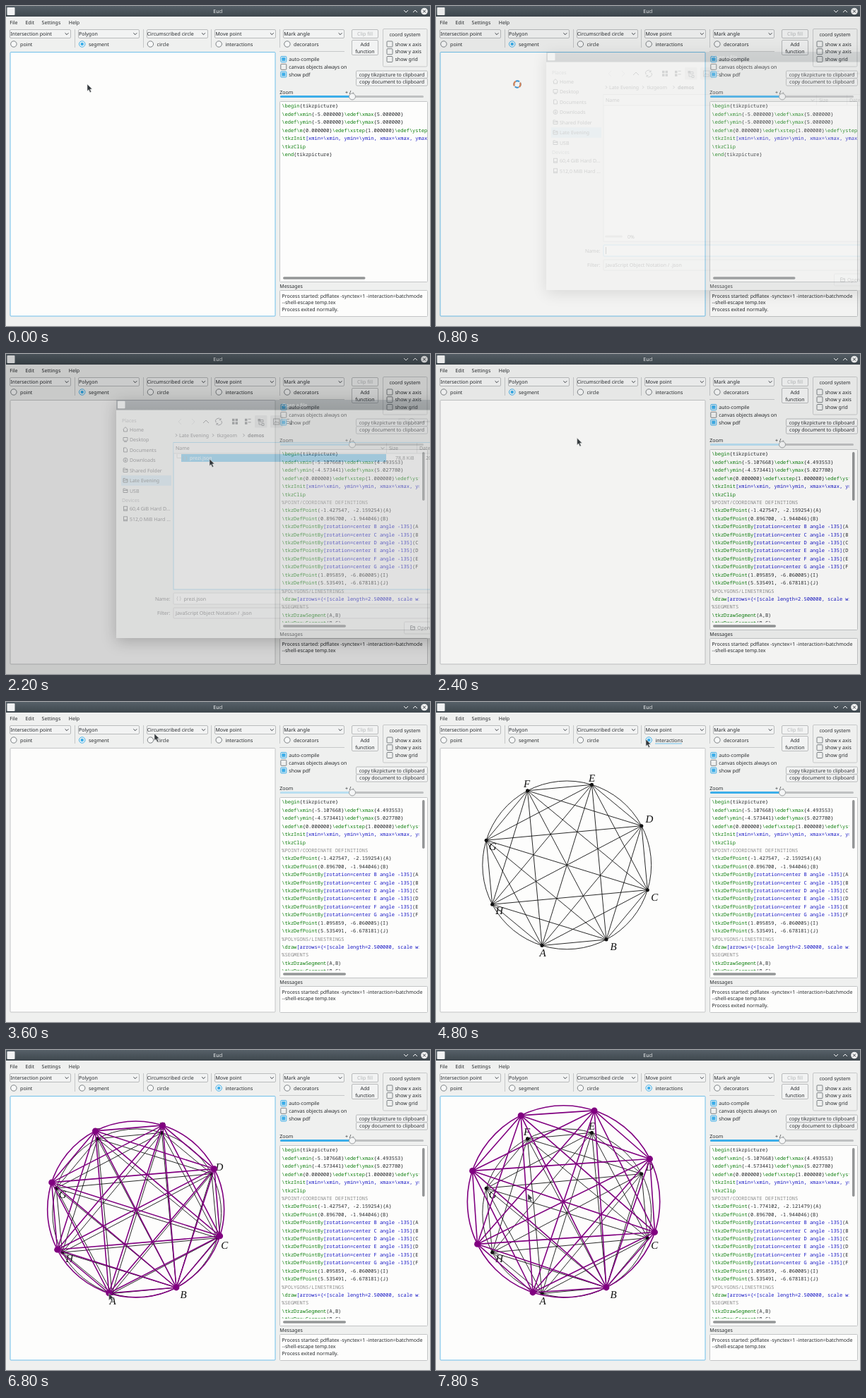
Animation of 600 by 454 pixels, one loop 8 s. Source, as an HTML page:

```html
<!DOCTYPE html>
<html lang="en">
<head>
<meta charset="utf-8">
<title>Eucl</title>
<style>
html, body { margin: 0; width: 100%; height: 100%; overflow: hidden; background: #eff0ef; }
svg { display: block; width: 600px; height: 454px; }
text { font: 7px "Noto Sans", sans-serif; fill: #26292c; white-space: pre; text-rendering: geometricPrecision; }
.mid { text-anchor: middle; }
.end { text-anchor: end; }
.bold { font-weight: bold; }
.grey { fill: #85898b; }
.pale { fill: #b4b6b7; }
.code text { font-family: "Noto Sans Mono", monospace; }
.cmd { fill: #0a7d0a; }
.opt { fill: #1414c4; }
.rem { fill: #8c8c8c; }
.label { font: italic 15px "Liberation Serif", serif; fill: #111; text-anchor: middle; }
.box { fill: #fdfdfc; stroke: #c3c5c6; }
.btn { fill: #f2f3f3; stroke: #b9bbbc; }
.line { fill: none; stroke: #3b4045; }
.soft { fill: none; stroke: #c6c8c9; }
.hot { stroke: #6fbfe9; }
.bar { fill: url(#bar); }
.ink { fill: #f2f3f4; }
.inkline { fill: none; stroke: #f2f3f4; }
.cross { fill: none; stroke: #3b4045; }
.off .bar { fill: #e4e6e6; }
.off .ink { fill: #b9bbbc; }
.off .inkline { stroke: #b9bbbc; }
.off .cross { stroke: #e4e6e6; }
.dot { fill: none; stroke: #7d8285; }
.on .dot { stroke: #3daee9; }
.pip { fill: #3daee9; visibility: hidden; }
.on .pip { visibility: inherit; }
#dialog { filter: drop-shadow(0 5px 11px rgba(0, 0, 0, .65)); }
#ghost { fill: none; stroke: #800080; stroke-width: 1.6; }
</style>
</head>
<body>
<svg id="stage" viewBox="0 0 600 454"></svg>
<script>
const STEP = 200, STEPS = 40;

const text = (x, y, s, cls = '') => `<text x="${x}" y="${y}" class="${cls}">${s}</text>`;
const rect = (x, y, w, h, cls, r = 0) =>
  `<rect x="${x}" y="${y}" width="${w}" height="${h}" rx="${r}" class="${cls}"/>`;
const fill = (x, y, w, h, color, r = 0) =>
  `<rect x="${x}" y="${y}" width="${w}" height="${h}" rx="${r}" fill="${color}"/>`;
const path = (d, cls = 'line', extra = '') => `<path d="${d}" class="${cls}" ${extra}/>`;
const circle = (x, y, r, attrs) => `<circle cx="${x}" cy="${y}" r="${r}" ${attrs}/>`;
const group = (id, body, attrs = '') => `<g id="${id}" ${attrs}>${body}</g>`;
const chevron = (x, y, dir, cls = 'line', k = 3) => path({
  down: `M${x - k} ${y - k / 2}l${k} ${k}l${k} ${-k}`,
  up: `M${x - k} ${y + k / 2}l${k} ${-k}l${k} ${k}`,
  left: `M${x + k / 2} ${y - k}l${-k} ${k}l${k} ${k}`,
  right: `M${x - k / 2} ${y - k}l${k} ${k}l${-k} ${k}`
}[dir], cls);

/* main window */

const combo = (x, label) => rect(Math.floor(x) + .5, 33.5, 86, 12, 'btn', 1.5) +
  text(x + .7, 42, label) + chevron(x + 80.5, 39.5, 'down', 'line', 2.4);

const radio = (x, label, id) => group(id,
  circle(x, 54, 4.2, 'class="dot" style="fill:#f7f8f8"') + circle(x, 54, 2.3, 'class="pip"') +
  text(x + 9.2, 56.5, label));

const check = (x, y, label, on) => `<g class="${on ? 'on' : ''}">` +
  rect(x - 4, y - 4, 8, 8, 'dot', 1) + rect(x - 2.5, y - 2.5, 5, 5, 'pip') + '</g>' +
  text(x + 7.5, y + 2.5, label);

const button = (x, y, w, h, label, cls = '') =>
  rect(x, y, w, h, 'btn', 1.5) + text(x + w / 2, y + h / 2 + 2.4, label, 'mid ' + cls);

const titleBar = () => rect(0, 0, 600, 15, 'bar') + rect(1.5, 2, 11, 11, 'ink', 1) +
  text(300, 10, 'Eucl', 'mid ink') +
  chevron(566, 7.5, 'down', 'inkline') + chevron(579, 7.5, 'up', 'inkline') +
  circle(592, 7.5, 4.8, 'class="ink"') +
  path('M590 5.5l4 4m0 -4l-4 4', 'cross');

function mainWindow() {
  const columns = [
    [5.5, 'Intersection point', 'point'], [102.3, 'Polygon', 'segment'],
    [199, 'Circumscribed circle', 'circle'], [295.8, 'Move point', 'interactions'],
    [392.5, 'Mark angle', 'decorators']
  ];
  const tools = columns.map(([x, top, low]) =>
    combo(x, top) + radio(x + 5.4, low, low) +
    (x > 50 ? path(`M${Math.floor(x) - 4.5} 33v26`, 'soft') : '')).join('');
  return fill(0, 0, 600, 454, '#eff0ef') + group('mainBar', titleBar()) +
    text(5.3, 26.3, 'File') + text(27.4, 26.3, 'Edit') + text(50.6, 26.3, 'Settings') + text(88.8, 26.3, 'Help') +
    tools + path('M387 64.5h92', 'soft') +
    path('M310 59h38', 'line hot', 'id="focus"') +
    button(489.5, 33.5, 37, 12, 'Clip fill', 'pale') +
    rect(489.5, 48.5, 37, 21, 'btn', 1.5) + text(508, 57, 'Add', 'mid') + text(508, 66.5, 'function', 'mid') +
    rect(533.5, 32.5, 62.5, 53.5, 'soft', 1.5) + text(564.5, 43, 'coord system', 'mid') +
    check(543, 54, 'show x axis') + check(543, 64.7, 'show y axis') + check(543, 75.5, 'show grid') +
    check(392.8, 75.5, 'auto-compile', true) + check(392.8, 86.3, 'canvas objects always on') +
    check(392.8, 97, 'show pdf', true) +
    button(495.5, 92, 101, 10.3, 'copy tikzpicture to clipboard') +
    button(495.5, 102.8, 101, 10.3, 'copy document to clipboard') +
    text(387.3, 125, 'Zoom') + text(480, 125, '+ / -') +
    fill(388, 127, 203, 3, '#bfc1c2', 1.5) +
    '<rect id="zoom" x="388" y="127" width="102" height="3" rx="1.5"/>' +
    circle(490, 128.5, 4.5, 'fill="#f5f6f6" stroke="#9a9d9f"') +
    rect(6, 65.5, 375, 374.5, 'box', 1).replace('<rect', '<rect id="canvas"') +
    rect(387.5, 135.5, 209, 256, 'box', 1) + group('code', '', 'class="code"') +
    text(387.3, 400, 'Messages') + rect(387.5, 403.5, 209, 37, 'box', 1) +
    text(390.5, 413.5, 'Process started: pdflatex -synctex=1 -interaction=batchmode') +
    text(390.5, 423.3, '--shell-escape temp.tex') +
    group('exited', text(390.5, 433, 'Process exited normally.'));
}

/* code pane */

const bare = String.raw`\begin{tikzpicture}
\edef\xmin{-5.000000}\edef\xmax{5.000000}
\edef\ymin{-5.000000}\edef\ymax{5.000000}
\edef\m{0.000000}\edef\xstep{1.000000}\edef\ystep{1.000000}
\tkzInit[xmin=\xmin, ymin=\ymin, xmax=\xmax, ymax=\ymax]
\tkzClip
\end{tikzpicture}`;

function loaded(a) {
  const [begin, , , steps, init, clip] = bare.split('\n');
  const turns = [...'BCDEFG'].map((p, i) =>
    `\\tkzDefPointBy[rotation=center ${p} angle -135](${'ABCDEF'[i]})`);
  return [begin,
    '\\edef\\xmin{-5.107668}\\edef\\xmax{4.493553}',
    '\\edef\\ymin{-4.573441}\\edef\\ymax{5.027780}',
    steps, init, clip, '%POINT/COORDINATE DEFINITIONS',
    `\\tkzDefPoint(${a}){A}`, '\\tkzDefPoint(0.896700, -1.944046){B}', ...turns,
    '\\tkzDefPoint(1.095859, -6.060005){I}', '\\tkzDefPoint(5.535491, -6.678181){J}',
    '%POLYGONS/LINESTRINGS', '\\draw[arrows={<[scale length=2.500000, scale width=2.500000]',
    '%SEGMENTS', '\\tkzDrawSegment(A,B)', '\\tkzDrawSegment(B,C)'].join('\n');
}

const paint = s => s.replace(/^%.*|\[[^\]]*\]?|\\[a-zA-Z]+/g, m => {
  const cls = { '%': 'rem', '[': 'opt', '\\': 'cmd' }[m[0]];
  return `<tspan class="${cls}">${m.replace(/</g, '&lt;')}</tspan>`;
});

function codePane(source, long) {
  const rows = source.split('\n').map((s, i) => text(390.3, 144.4 + i * 11.42, paint(s))).join('');
  return `<g clip-path="url(#${long ? 'narrow' : 'wide'})">${rows}</g>` +
    fill(392, 384.3, long ? 89 : 116.5, 3.5, '#949697', 1.7) +
    (long ? fill(589, 139, 3.5, 69, '#949697', 1.7) : '');
}
const panes = [
  codePane(bare, false),
  codePane(loaded('-1.427547, -2.159254'), true),
  codePane(loaded('-1.774102, -2.121479'), true)
];

/* file dialog */

function dialog() {
  const places = ['Home', 'Desktop', 'Documents', 'Downloads', 'Shared Folder', 'Late Evening', 'USB'];
  const folder = (x, y) => path(`M${x - 3} ${y + 2.5}v-5.5h2.5l1 1.2h2.5v4.3z M${x - 3} ${y - .5}h6`);
  const glyphs = [
    (x, y) => path(`M${x - 3.5} ${y}l3.5 -3.3l3.5 3.3m-1 0v3h-5v-3`),
    (x, y) => path(`M${x - 3} ${y - 3}h6v4.5h-6zM${x - 2} ${y + 3}h4`),
    (x, y) => path(`M${x - 2.5} ${y - 3}h3.2l1.8 1.8v4.2h-5z`),
    (x, y) => circle(x, y, 3, 'class="line"') + path(`M${x} ${y - 2}v3.5m-1.3 -1.3l1.3 1.3l1.3 -1.3`),
    folder, folder, folder
  ];
  const side = places.map((p, i) => {
    const y = 107 + i * 14.5;
    return glyphs[i](169, y) + text(175, y + 2.5, p);
  }).join('');
  const cells = (x, n) => [0, 1, 2, 3].map(i =>
    fill(x - 4 + (i % 2) * 4.6, 91.8 + (i >> 1) * 4.6, i % 2 ? n : 3.4, i % 2 && n > 3.4 ? 1 : 3.4, '#33383c')).join('');
  const drive = y => rect(166.5, y - 3, 5, 6, 'line') + path(`M167 ${y + 1.5}h4`);
  return fill(156, 65, 460, 338, '#eff0ef') +
    rect(156, 65, 460, 14.5, 'bar') + rect(158, 66.7, 10.5, 10.5, 'ink', 1) +
    text(408.5, 74.7, 'Open a file', 'mid ink') +
    text(164, 97, 'Places', 'grey') +
    group('hover', fill(163, 114.5, 71, 14.5, '#e0ebf0')) +
    fill(163, 172.3, 71, 14.5, '#bfdff0') + side +
    text(164, 210, 'Devices', 'grey') +
    drive(219.3) + text(175, 222, '60,4 GiB Hard D...') + drive(233.8) + text(175, 236.5, '512,0 MiB Hard ...') +
    chevron(246, 96, 'left', 'soft', 4) + chevron(265, 96, 'right', 'soft', 4) + chevron(283, 96, 'up', 'line', 4) +
    path('M297.2 97.2a3.9 3.9 0 0 1 6.6 -4.2m1 1.8a3.9 3.9 0 0 1 -6.6 4.2m5.8 -7.8v2.3h-2.3m-3.7 7.3v-2.3h2.3') +
    fill(352, 87, 17.5, 17.5, '#d0d2d3', 1.5) + fill(374, 87, 17.5, 17.5, '#d0d2d3', 1.5) +
    cells(324, 3.4) + cells(342, 4) +
    fill(356.5, 92, 3.5, 3.5, '#33383c') + path('M358 95.5v4.5h4m-2 -6.5h4v3h-4zm2 5h3v3h-3z') +
    rect(378.5, 92, 8.5, 8, 'line') + path('M379.5 98.5l2.3 -3l1.6 2l1.2 -1.2l1.8 2.2') +
    path('M397 92.5h4m-4 3h4m-4 3h4m2.5 -5v7m-1.5 -1.5l1.5 1.5l1.5 -1.5') +
    rect(556, 92, 8.5, 8, 'soft') + path('M558 94l4.5 4.5m0 -4.5l-4.5 4.5', 'soft') +
    fill(574, 94.7, 30, 2.4, '#bfc1c2') + circle(574, 96, 4.4, 'fill="#f5f6f6" stroke="#9a9d9f"') +
    chevron(241, 115.3, 'right', 'line', 2) + text(245, 118, 'Late Evening') +
    chevron(293, 115.3, 'right', 'line', 2) + text(298.5, 118, 'tkzgeom') +
    chevron(336.5, 115.3, 'right', 'line', 2) + text(342, 118, 'demos', 'bold') +
    rect(237, 125.5, 380, 208.5, 'box').replace('<rect', '<rect id="list"') +
    fill(237.5, 126, 380, 15, '#f3f4f3') + path('M237 141h363M538.5 126v15M581.5 126v15', 'soft') +
    text(240, 136, 'Name') + chevron(533, 133.5, 'down', 'line', 2.4) + text(542, 136, 'Size') + text(585, 136, 'Date') +
    group('file', path('M242 142v5.5h6', 'soft') +
      group('pick', fill(248, 142, 290, 11, '#3daee9')) +
      text(253, 149.5, '{ }', 'mid grey') + text(260, 150, 'prezi.json', 'picked') +
      text(577.5, 150, '78,8 KiB', 'end') + text(594, 150, '2020')) +
    group('load', fill(239, 325.5, 25, 3, '#c3c5c6', 1.5) + text(271, 330, '0%')) +
    text(232.5, 349.6, 'Name:', 'end') +
    rect(237, 339, 380, 16, 'box', 1).replace('<rect', '<rect id="name"') +
    group('caret', path('M240.5 342v10')) +
    group('typed', text(244.5, 349.3, '{ }', 'mid grey') + text(251.5, 349.6, 'prezi.json')) +
    text(232.5, 370, 'Filter:', 'end') + rect(237, 360, 380, 15, 'btn', 1) +
    text(240, 370, 'JavaScript Object Notation / .json') +
    rect(563.5, 380, 60, 17, 'btn', 1.5) + folder(575.5, 388.5) + text(582, 391, 'Open');
}

/* figure: a regular octagon from its side AB, with every chord */

const A = [150, 345.5], B = [241, 337], C45 = Math.SQRT1_2;

function octagon(a, b) {
  const pts = [a];
  let [x, y] = a, dx = b[0] - a[0], dy = b[1] - a[1];
  for (let i = 1; i < 8; i++) {
    pts.push([x += dx, y += dy]);
    [dx, dy] = [C45 * (dx + dy), C45 * (dy - dx)];
  }
  return pts;
}

function ring(pts, attrs) {
  const [p, , , , q] = pts;
  return circle((p[0] + q[0]) / 2, (p[1] + q[1]) / 2, Math.hypot(p[0] - q[0], p[1] - q[1]) / 2, attrs);
}

function figure(pts, r, color) {
  let d = '';
  pts.forEach((p, i) => pts.slice(i + 1).forEach(q => d += `M${p}L${q}`));
  return ring(pts, '') + `<path d="${d}"/>` +
    pts.map(p => circle(...p, r, `fill="${color}" stroke="none"`)).join('');
}

const base = octagon(A, B);
const offsets = [[1, 15.5], [10, 15], [10, 15], [11, -5], [0, -4.5], [-1, -4.5], [9, 14], [10, 13.5]];
const labels = base.map(([x, y], i) =>
  text(x + offsets[i][0], y + offsets[i][1], 'ABCDEFGH'[i], 'label')).join('');

const arrow = path('M0 0V9.6L2.2 7.7L3.9 11.6L5.6 10.8L3.9 7.1L6.9 6.8Z', '',
  'fill="#33383c" stroke="#d4d5d5" stroke-width=".6"');
const busy = circle(0, 0, 4.7, 'fill="none" stroke="#e4e6e7" stroke-width="2.4"') +
  circle(0, 0, 4.7, 'fill="none" stroke="#3b93cf" stroke-width="1.9" stroke-dasharray="5.4 2"') +
  path('M0 -4.7A4.7 4.7 0 0 1 4.7 0M0 4.7A4.7 4.7 0 0 1 -4.7 0', '', 'fill="none" stroke="#e2814d" stroke-width="1.9"');

document.getElementById('stage').innerHTML = `<defs>
  <linearGradient id="bar" x2="0" y2="1"><stop stop-color="#566068"/><stop offset="1" stop-color="#3f484e"/></linearGradient>
  <clipPath id="wide"><rect x="388" y="136" width="208" height="245"/></clipPath>
  <clipPath id="narrow"><rect x="388" y="136" width="196.5" height="245"/></clipPath></defs>` +
  mainWindow() +
  group('plot', `<g fill="none" stroke="#111" stroke-width=".9">${figure(base, 2.5, '#111')}</g>` + labels) +
  group('ghost', '') +
  group('dim', fill(0, 0, 600, 454, '#000')) + group('dialog', dialog()) +
  group('arrow', arrow) + group('busy', busy);

/* timeline, in steps */

const track = [
  [4, 115, 111], [5, 145, 116], [6, 182, 121], [9, 288, 149], [11, 288, 149], [14, 23, 60],
  [16, 85, 50], [18, 210, 45], [20, 293, 52], [21, 297, 53], [26, 297, 53], [28, 205, 230],
  [30, 156, 348], [32, 150, 346], [33, 150, 346], [36, 137, 344], [37, 137, 344], [38, 135, 330], [39, 130, 204]
];

function pointer(s) {
  const n = track.findIndex(k => k[0] >= s);
  const [t1, x1, y1] = track[n], [t0, x0, y0] = track[Math.max(0, n - 1)];
  const k = t1 > t0 ? (s - t0) / (t1 - t0) : 1;
  return [x0 + (x1 - x0) * k, y0 + (y1 - y0) * k];
}

const $ = id => document.getElementById(id);
const show = (id, on) => $(id).style.visibility = on ? 'visible' : 'hidden';
const within = (s, from, to) => s >= from && s < to;

function ghost(s) {
  if (s < 30) return '';
  if (s < 32) return ring(base, '');
  if (s < 33) return circle(...A, 4.4, 'fill="#800080"');
  const k = Math.min(1, (s - 33) / 3);
  return figure(octagon([A[0] - 13 * k, A[1] - 1.5 * k], B), 4.4, '#800080');
}

function draw(s) {
  const [x, y] = pointer(s), spin = within(s, 3, 5);
  const picked = s >= 9;
  show('arrow', !spin);
  show('busy', spin);
  $('arrow').setAttribute('transform', `translate(${x} ${y})`);
  $('busy').setAttribute('transform', `translate(${x} ${y}) rotate(${s * 60})`);

  $('dialog').style.opacity = within(s, 4, 12) ? { 4: .16, 5: .92, 11: .33 }[s] || 1 : 0;
  $('dim').style.opacity = within(s, 4, 13) ? { 4: .04, 5: .3, 11: .16, 12: .04 }[s] || .38 : 0;
  $('mainBar').classList.toggle('off', within(s, 5, 11));
  show('hover', s === 6);
  show('file', s >= 5);
  show('load', s === 4);
  show('caret', s === 4);
  show('pick', picked);
  show('typed', picked);
  document.querySelector('.picked').style.fill = picked ? '#fff' : '';
  $('list').classList.toggle('hot', picked);
  $('name').classList.toggle('hot', !picked);

  $('segment').classList.toggle('on', s < 24);
  $('interactions').classList.toggle('on', s >= 24);
  show('focus', within(s, 24, 33));
  $('canvas').classList.toggle('hot', s < 5 || s >= 27);
  $('zoom').setAttribute('fill', within(s, 5, 24) ? '#b9dff1' : '#3daee9');
  show('exited', s < 11 || within(s, 24, 38));
  $('code').innerHTML = panes[s < 11 ? 0 : s < 38 ? 1 : 2];
  show('plot', s >= 24);
  $('ghost').innerHTML = ghost(s);
}

let last = -1;
function tick() {
  const s = Math.floor(performance.now() / STEP) % STEPS;
  if (s !== last) draw(last = s);
  requestAnimationFrame(tick);
}
tick();
</script>
</body>
</html>
```
